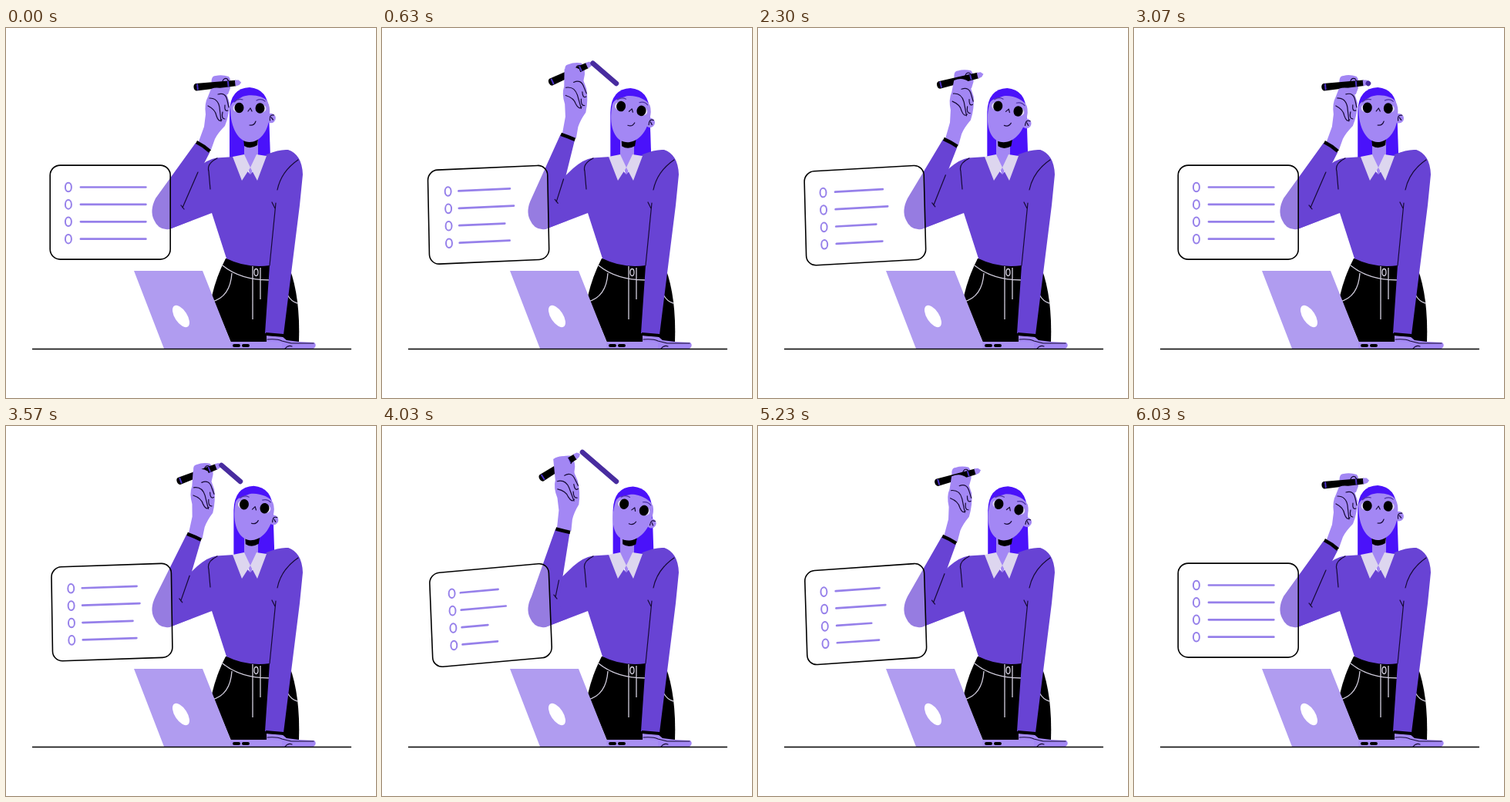
These frames come from a looping animation (480 by 480 pixels, 6060 ms). An HTML page:

```html
<!DOCTYPE html>
<html lang="en">
<head>
<meta charset="utf-8">
<title>Checklist</title>
<style>
html, body { margin: 0; width: 100%; height: 100%; overflow: hidden; background: #fff; }
svg { display: block; width: 100vw; height: 100vh; }
.skin { fill: #a387f4; }
.knit { fill: #6843d4; }
.hair { fill: #4a12fa; }
.ink { fill: none; stroke: #160a35; stroke-width: 1.2; stroke-linecap: round; stroke-linejoin: round; }
.seam { fill: none; stroke: #d3cfdf; stroke-width: 1.3; }
.item { fill: none; stroke: #9680ea; stroke-width: 2.7; stroke-linecap: round; }
</style>
</head>
<body>
<svg viewBox="0 0 480 480">
  <path id="hair" class="hair" d="M290 169V108Q291 78 316 77Q340 79 341 108L343 169Z"/>
  <path class="skin" d="M309 138H327V166L317 192L309 166Z"/>
  <path id="choker" d="M308 143H327L326 152Q317 158 309 153Z"/>

  <g id="head">
    <circle class="skin" cx="343.500" cy="117" r="6.300"/>
    <path class="ink" d="M347.500 113Q341 112 342.500 120M344 116L346.500 119"/>
    <path class="skin" d="M291 104C291 96 299 94 307 89C318 85 334 88 339 95Q343 102 342 112C341 136 328 148 316 148C302 148 291 130 291 104Z"/>
    <ellipse cx="300" cy="104" rx="5.500" ry="5" fill="#e4ddf8"/>
    <ellipse cx="332" cy="104.500" rx="5.500" ry="5" fill="#e4ddf8"/>
    <ellipse cx="302.500" cy="103.500" rx="6" ry="6.800"/>
    <ellipse cx="329.500" cy="104" rx="6" ry="6.800"/>
    <path class="ink" style="stroke:#4a2fa5" d="M296 96Q301 91 307 93M325 94Q331 91 336 95"/>
    <path class="ink" d="M317 104L314 108M317 104L319 108M316 126Q322 127 324 121"/>
  </g>

  <path d="M285 299Q273 322 267 348L292 408H380Q382 350 368 312L341 302Z"/>
  <path class="seam" d="M281 308Q304 327 342 327M320 309V378M330 311V352M293 318Q291 349 267 355M365 346Q370 355 378 357"/>
  <ellipse class="seam" cx="324.500" cy="317" rx="2.500" ry="4.500"/>

  <path class="knit" d="M296 167L273 168.500Q262 170 248 182L226 203L200 255L212 261L267 240L286 299Q312 312 342 308L336 396L360 398L381 230L385 190Q384 164 366 158Q355 157 338 164L317 190Z"/>
  <path id="sleeve" class="knit"/>
  <path class="ink" d="M274 169Q260 176 263 186L265 209M379 171Q357 186 352 210M350 227L342 308M345 226L349 234"/>
  <path id="crease" class="ink"/>
  <path class="skin" d="M309 160H325L317 190Z"/>
  <path fill="#ddd6ef" d="M294 167L309 164L317 181L306 198ZM317 181L325 164L338 166L326 198Z"/>

  <path fill="#b09cf0" d="M166 315H255L291.500 407H358V416H205Z"/>
  <path class="skin" d="M291.500 407H358V416H291.500Z" opacity=".6"/>
  <ellipse cx="227" cy="374" rx="16" ry="8" fill="#fff" transform="rotate(57 227 374)"/>
  <path d="M296 412H302M308 412H314" stroke="#000" stroke-width="4" stroke-linecap="round"/>
  <path class="skin" d="M338 399L358 400L364 405L380 407L400 408Q404 412 399 416H358V408L338 407Z"/>
  <path class="ink" d="M339 404Q352 403 358 406L370 409H399M362 416Q366 411 371 413"/>
  <path d="M337 395L360 397V401L338 399Z"/>
  <path d="M34 416.500H448" stroke="#000" stroke-width="1.600"/>

  <g class="hand"><path class="skin" d="M267 75Q265 62 272 62Q280 60 289 63Q293 68 291 78L288 86L268 88Z"/>
    <path class="ink" d="M281 69Q283 64 287 66Q290 69 287 73"/></g>
  <g id="pen">
    <path d="M3 -4.800L55 -3.800V3.800L3 4.800Q0 4 0 0Q0 -4 3 -4.800Z"/>
    <path d="M5 -4V4M45 -3.500V3.500" stroke="#4a2fc5" stroke-width="2"/>
    <path class="skin" d="M54 -4L59 -3.500L62 0L59 3L54 4Z"/>
  </g>
  <g class="hand">
    <path id="palm" class="skin"/>
    <path class="ink" d="M264 91Q275 91 277 103L279 121M262 101Q272 106 273 114Q276 123 280 119M275 86Q285 83 287 94L289 103M281 109Q279 118 284 118M284 100Q283 109 288 107"/>
  </g>
  <path id="cuff" fill="none" stroke="#000" stroke-width="4.500"/>
  <path id="trail" fill="none" stroke="#482c9f" stroke-width="6.500" stroke-linecap="round"/>

  <g id="panel">
    <rect width="156" height="122" rx="13" fill="#fff" fill-opacity=".3" stroke="#000" stroke-width="1.600"/>
  </g>
</svg>
<script>
const LOOP = 3030, RISE = LOOP / 3;
const shrink = [47.5, 35, 68, 52];
const $ = id => document.getElementById(id);
const set = (el, name, value) => el.setAttribute(name, value);
const wave = x => (1 - Math.cos(Math.PI * x)) / 2;
const clamp = x => Math.min(1, Math.max(0, x));
const mix = (p, q, k) => [p[0] + (q[0] - p[0]) * k, p[1] + (q[1] - p[1]) * k];

function add(tag) {
  const el = document.createElementNS("http://www.w3.org/2000/svg", tag);
  set(el, "class", "item");
  $("panel").append(el);
  return el;
}

const rows = shrink.map((cut, i) => {
  const y = 28.4 + 22.4 * i, dot = add("ellipse"), line = add("path");
  set(dot, "cy", y);
  set(dot, "rx", 4);
  set(dot, "ry", 5.8);
  set(dot, "style", "stroke-width:2");
  return { cut, y, dot, line };
});

function drawPanel(sway, reach) {
  const m = [1 - sway * 0.013, -sway * 0.119, sway * 0.054, 1, 57.2 + sway * 5.6, 178.1 + sway * 17.9];
  set($("panel"), "transform", `matrix(${m})`);
  for (const { cut, y, dot, line } of rows) {
    set(dot, "cx", 23.7 + 4.7 * reach * reach);
    set(line, "d", `M39.700 ${y}h${84.5 - cut * sway}`);
  }
}

function drawHead(turn) {
  set($("head"), "transform", `rotate(${20.5 * turn} 316 141)`);
  set($("hair"), "transform", `translate(${11.5 * turn} ${1.7 * turn})`);
  set($("choker"), "transform", `translate(${4 * turn} ${turn}) rotate(${5 * turn} 317 151)`);
}

function drawArm(a) {
  const left = mix([246, 149], [225, 133.5], a), right = mix([264.5, 161], [243.5, 138.5], a);
  const wrist = mix([255, 155], [234, 136], a);
  set($("sleeve"), "d", `M${left}L194 221Q186 237 192 249Q198 263 212 261L240 250L229 230L${right}Z`);
  set($("cuff"), "d", `M${mix([247, 148], [225.5, 133.5], a)}Q${mix([257, 153], [235, 136], a)} ${mix([264.5, 160], [244, 138], a)}`);
  const low = mix([229, 233], [225, 222], a);
  set($("crease"), "d", `M${mix([249, 187], [229.5, 200], a)}L${low}m-2 -3l4 5`);
  document.querySelectorAll(".hand").forEach(el => set(el, "transform",
    `translate(${wrist}) rotate(${-14 * a}) translate(-255 -155)`));
  const top = 79 - 17 * a;
  set($("palm"), "d", `M249 150L257 128L259 112Q257 98 262 89L266 ${top}Q277 ${top - 4} 285 ${top + 3}L290 97Q290 112 284 127Q275 136 271 144L266 158Z`);

  const end = mix([243.5, 77], [204.5, 69], a), tip = mix([303, 71], [260, 34], a);
  const angle = Math.atan2(tip[1] - end[1], tip[0] - end[0]) * 180 / Math.PI;
  set($("pen"), "transform", `translate(${end}) rotate(${angle})`);
}

function drawTrail(t, reach) {
  const from = wave(clamp((t - 1400) / 530)), to = t < RISE ? reach : 1;
  const start = [304, 72], stop = [260, 34];
  const shown = t > 25 && from < 1;
  set($("trail"), "d", shown ? `M${mix(start, stop, from)}L${mix(start, stop, to + 0.001)}` : "");
}

function draw(now) {
  const t = now % LOOP;
  const sway = wave(2 * t / LOOP);
  const reach = t < RISE ? wave(t / RISE) : 1 - wave((t - RISE) / (LOOP - RISE));
  drawPanel(sway, reach);
  drawHead(sway ** 0.6);
  drawArm(reach);
  drawTrail(t, reach);
}

const began = performance.now();
function tick() {
  draw(performance.now() - began);
  requestAnimationFrame(tick);
}
tick();
</script>
</body>
</html>
```
